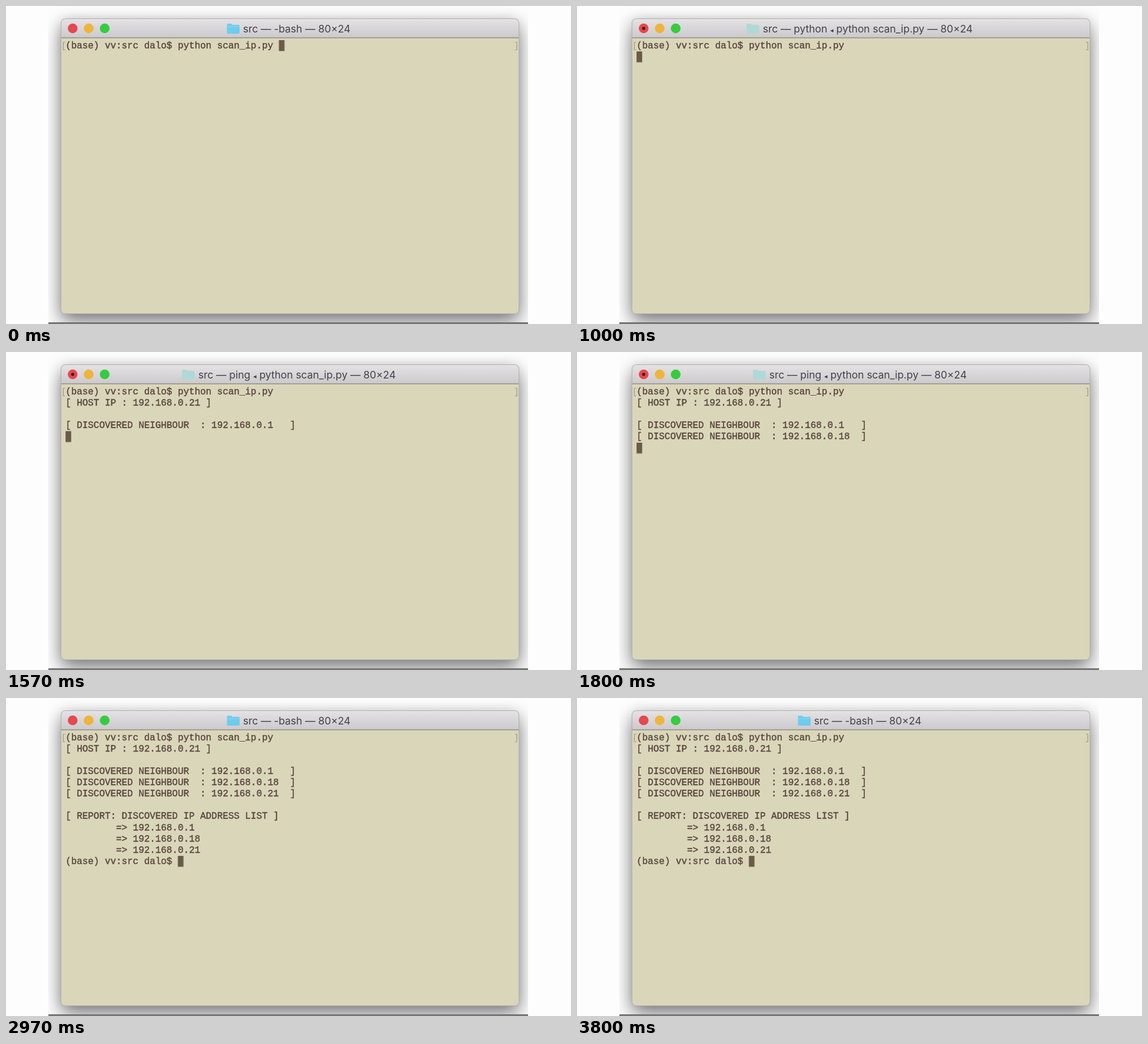
An HTML page for the animation above (3.83 s loop, 960x540 px).

```html
<!DOCTYPE html>
<html lang="en">
<head>
<meta charset="utf-8">
<title>Terminal IP scan</title>
<style>
  html, body { margin: 0; width: 960px; height: 540px; overflow: hidden; background: #fdfdfd; }
  .shot { position: absolute; left: 72px; top: 0; width: 815px; height: 540px; overflow: hidden; }
  .shot::after { content: ""; position: absolute; left: 0; right: 0; top: 537px; height: 3px; background: #777674; }
  .window {
    position: absolute; left: 22px; top: 22px; width: 777px; height: 500px;
    border-radius: 7px 7px 6px 6px; background: #dad6ba;
    box-shadow: 0 0 0 1px #b3b0aa, 0 14px 32px rgba(0, 0, 8, .5), 0 0 22px rgba(0, 0, 8, .12);
  }
  .bar {
    height: 31px; border-bottom: 2px solid #a3a095; border-radius: 7px 7px 0 0;
    background: linear-gradient(#e4e2e4, #cdcacd);
  }
  svg { position: absolute; left: 0; top: 0; }
  .title { font: 17.4px Inter, "DejaVu Sans", sans-serif; fill: #444146; text-anchor: middle; }
  .title tspan { font-size: 11px; }
  pre {
    position: absolute; left: 101.2px; top: 58.8px; margin: 0; color: #57453c;
    font: 15.9px/19.1px "Liberation Mono", monospace; -webkit-text-stroke: .4px #57453c;
  }
  .mark { font: 14px "Liberation Mono", monospace; fill: #a09a80; }

  .cursor, .show, .idle, .busy, .python, .ping { animation: 3830ms step-end infinite; }
  .cursor { animation-name: cursor; }
  .idle { animation-name: idle; }
  .busy { animation-name: busy; }
  .python { animation-name: python; }
  .ping { animation-name: ping; }
  .host { animation-name: host; }
  .first { animation-name: first; }
  .second { animation-name: second; }
  .third { animation-name: third; }
  .report { animation-name: report; }

  @keyframes host { 0% { opacity: 0 } 31.3%, 100% { opacity: 1 } }
  @keyframes first { 0% { opacity: 0 } 34.7%, 100% { opacity: 1 } }
  @keyframes second { 0% { opacity: 0 } 46%, 100% { opacity: 1 } }
  @keyframes third { 0% { opacity: 0 } 47.9%, 100% { opacity: 1 } }
  @keyframes report { 0% { opacity: 0 } 67.9%, 100% { opacity: 1 } }
  @keyframes idle { 0% { opacity: 1 } 26.1% { opacity: 0 } 67.9%, 100% { opacity: 1 } }
  @keyframes busy { 0% { opacity: 0 } 26.1% { opacity: 1 } 67.9%, 100% { opacity: 0 } }
  @keyframes python { 0% { opacity: 0 } 26.1% { opacity: 1 } 34.7%, 100% { opacity: 0 } }
  @keyframes ping { 0% { opacity: 0 } 34.7% { opacity: 1 } 67.9%, 100% { opacity: 0 } }
  @keyframes cursor {
    0% { transform: translate(362.5px, 0) }
    26.1% { transform: translate(0, 19.1px) }
    31.3% { transform: translate(0, 57.3px) }
    34.7% { transform: translate(0, 76.4px) }
    46% { transform: translate(0, 95.5px) }
    47.9% { transform: translate(0, 114.6px) }
    67.9%, 100% { transform: translate(190.8px, 210.1px) }
  }
</style>
</head>
<body>
<div class="shot"><div class="window"><div class="bar"></div></div></div>

<svg width="960" height="540" viewBox="0 0 960 540">
  <defs>
    <path id="folder" d="M0 2q0-2 2-2h5l2 2h10.500q2 0 2 2v11q0 2-2 2H2q-2 0-2-2z"/>
  </defs>
  <circle cx="113.300" cy="38" r="8.300" fill="#e5484f"/>
  <circle cx="140.500" cy="38" r="8.300" fill="#eeb53a"/>
  <circle cx="167.700" cy="38" r="8.300" fill="#35cc40"/>
  <circle class="busy" cx="113.300" cy="38" r="2.700" fill="#571414"/>

  <g class="idle">
    <use href="#folder" x="375.500" y="30" fill="#6ecbee"/>
    <path d="M375.500 35h21.500" stroke="#90d9f2"/>
    <text class="title" x="494" y="45">src — -bash — 80×24</text>
  </g>
  <g class="python">
    <use href="#folder" x="288" y="30" fill="#b0d8d6"/>
    <text class="title" x="494" y="45">src — python <tspan>◂</tspan> python scan_ip.py — 80×24</text>
  </g>
  <g class="ping">
    <use href="#folder" x="299" y="30" fill="#b0d8d6"/>
    <text class="title" x="494.500" y="45">src — ping <tspan>◂</tspan> python scan_ip.py — 80×24</text>
  </g>

  <text class="mark" x="94" y="72">[</text>
  <text class="mark" x="863" y="72">]</text>
</svg>

<pre>(base) vv:src dalo$ python scan_ip.py
<span class="show host">[ HOST IP : 192.168.0.21 ]</span>

<span class="show first">[ DISCOVERED NEIGHBOUR  : 192.168.0.1   ]</span>
<span class="show second">[ DISCOVERED NEIGHBOUR  : 192.168.0.18  ]</span>
<span class="show third">[ DISCOVERED NEIGHBOUR  : 192.168.0.21  ]</span>

<span class="show report">[ REPORT: DISCOVERED IP ADDRESS LIST ]
         =&gt; 192.168.0.1
         =&gt; 192.168.0.18
         =&gt; 192.168.0.21
(base) vv:src dalo$</span></pre>

<svg width="960" height="540" viewBox="0 0 960 540">
  <rect class="cursor" x="101.200" y="58" width="9.500" height="18.500" fill="#6a5a48"/>
</svg>
</body>
</html>
```
